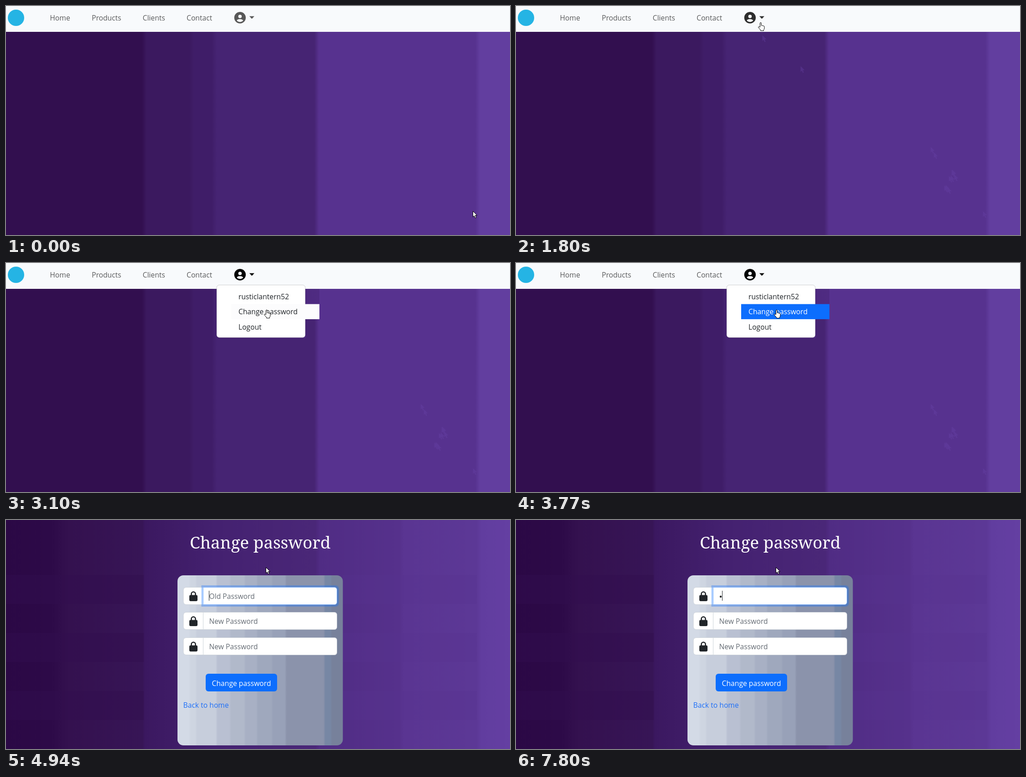
Write an HTML page that moves like this. It is 1108 px wide and 505 px high and loops after 8000 ms.

```html
<!DOCTYPE html>
<html lang="en">
<head>
<meta charset="utf-8">
<title>Change password</title>
<style>
  html, body { margin: 0; width: 100%; height: 100%; overflow: hidden; background: #320f4f; }
  svg { display: block; }
  text { font: 15.7px "Open Sans", "Noto Sans", sans-serif; fill: #212529; white-space: pre; }
  .nav text { fill: #5a5b5c; }
  .hint { fill: #656c74; }
  .title { font: 36.9px "Noto Serif", "Liberation Serif", serif; fill: #fff; }
</style>
</head>
<body>
<svg id="stage" width="1108" height="505" viewBox="0 0 1108 505"></svg>
<script>
const LOOP = 8000;
const MENU_OPEN = 2290, MENU_CLOSE = 3970, FORM_OPEN = 4940, TYPED = 7800;
const HAND_FROM = 1386;
const BLUE = '#0d6efd';

const ARROW = 'M.5 .5V13.2L3.4 10.5 5.6 15.5 7.8 14.6 5.6 9.6H9.6Z';
const HAND = 'M4.5 10.5V2Q4.5 .5 5.9 .5T7.3 2V7Q8.8 6 9.8 7.4 11.2 6.7 12.1 8.1 13.9 7.7 14 9.6V13' +
  'Q14 15 12.5 16.6V18.5H5.8V17L1 11.6Q.2 9.8 1.9 9.7Z';

const text = (x, y, str, attrs = '') => `<text x="${x}" y="${y}" ${attrs}>${str}</text>`;
const rect = (x, y, w, h, attrs) => `<rect x="${x}" y="${y}" width="${w}" height="${h}" ${attrs}/>`;

// Horizontal gradient from [x, colour] points.
function smooth(id, x0, x1, points) {
  const stops = points.map(([x, c]) => `<stop offset="${(x - x0) / (x1 - x0)}" stop-color="${c}"/>`);
  return `<linearGradient id="${id}" gradientUnits="userSpaceOnUse" x1="${x0}" x2="${x1}">${stops.join('')}</linearGradient>`;
}

// Flat colour bands; neighbours blend over 2 * soft px.
function bands(id, x0, x1, soft, list) {
  return smooth(id, x0, x1, list.flatMap(([x, c], i) =>
    i ? [[x - soft, list[i - 1][1]], [x + soft, c]] : [[x, c]]));
}

const defs = `<defs>
  ${bands('homeBg', 0, 1108, 5, [[0, '#320f4f'], [304, '#3b195f'], [408, '#3f1d68'],
    [458, '#462473'], [683, '#57328f'], [1037, '#623e9f']])}
  ${smooth('formBg', 0, 1108, [[0, '#2b0845'], [100, '#2d0a48'], [138, '#34114f'], [300, '#371556'],
    [306, '#3b1860'], [460, '#442170'], [680, '#4a2778'], [690, '#502c84'], [865, '#56318c'],
    [875, '#5a3592'], [1035, '#5c3896'], [1045, '#613d9f'], [1108, '#643fa2']])}
  ${bands('cardBg', 377, 740, 2, [[377, '#d3dae6'], [404, '#ced5e1'], [418, '#c7cedc'], [463, '#b9c0d2'],
    [493, '#b1b9ca'], [525, '#a8b0c4'], [552, '#9fa8bd'], [585, '#98a1b8'], [615, '#8b93ab'],
    [700, '#7787a4'], [715, '#77819b']])}
  ${smooth('menuTrace', 463, 689, [[463, '#43206d'], [689, '#4f2b82']])}
</defs>`;

const userIcon = `<g id="user">
  <g transform="translate(501.8 13.1) scale(.0494)">
    <circle cx="256" cy="256" r="256"/>
    <circle cx="256" cy="200" r="76" fill="#f8fafc"/>
    <path d="M399 384C377 346 335 320 288 320H224C177 320 135 346 113 384 148 423 199 448 256 448S364 423 399 384Z" fill="#f8fafc"/>
  </g>
  <path d="M535 22.6H546L540.5 28.2Z"/>
</g>`;

const home = `<g id="home">
  ${rect(0, 0, 1108, 505, 'fill="url(#homeBg)"')}
  <g id="traces" fill="#6a45a8" opacity=".35"></g>
  <g id="menuShade" fill="url(#menuTrace)">
    ${rect(463, 57, 196, 109, '')}
    ${rect(659, 57, 30, 67, 'id="itemShade"')}
  </g>
  <g class="nav">
    ${rect(0, 0, 1108, 57, 'fill="#f8fafc"')}
    <circle cx="22" cy="26" r="18" fill="#25b4e4"/>
    ${text(96.5, 32, 'Home')}${text(188.5, 32, 'Products')}
    ${text(300.5, 32, 'Clients')}${text(397, 32, 'Contact')}
    ${userIcon}
  </g>
  <g id="menu">
    ${rect(463, 48.5, 195, 116, 'rx="6" fill="#fff" stroke="#000" stroke-opacity=".18"')}
    ${rect(495, 57.3, 194, 33.3, 'id="hover"')}
    ${text(511, 80, 'rusticlantern52')}
    ${text(511, 113.3, 'Change password', 'id="change"')}
    ${text(511, 146.6, 'Logout')}
  </g>
</g>`;

const lock = y => rect(403, y + 17, 18, 13.5, 'rx="2.4" fill="#212529"') +
  `<path d="M407.5 ${y + 18}v-3.5a4.5 4.5 0 0 1 9 0v3.5" fill="none" stroke="#212529" stroke-width="2.6"/>`;

function field(y, hint, id, focused) {
  const ring = focused
    ? `<path d="M429.5 144H723Q732 144 732 153V182Q732 191 723 191H429.5Z" fill="${BLUE}" opacity=".33"/>` : '';
  return rect(390, y, 50, 38, 'rx="6" fill="#fff" stroke="#ced4da"') + lock(y) + ring +
    `<path d="M433.5 ${y}H721.5Q727.5 ${y} 727.5 ${y + 6}V${y + 32}Q727.5 ${y + 38} 721.5 ${y + 38}H433.5Z"
      fill="#fff" stroke="${focused ? '#86b7fe' : '#ced4da'}"/>` +
    text(446.5, y + 25.7, hint, `class="hint" id="${id}"`);
}

const tileRows = [121, 249, 377].map(y =>
  rect(0, y, 303, 64, 'fill="#320f4f" opacity=".45"') +
  rect(740, y, 295, 64, 'fill="#57328f" opacity=".3"')).join('');

const form = `<g id="form">
  ${rect(0, 0, 1108, 505, 'fill="url(#formBg)"')}${tileRows}
  ${text(404, 62.5, 'Change password', 'class="title"')}
  ${rect(377, 122, 363.5, 375, 'rx="13" fill="url(#cardBg)"')}
  ${field(148.5, 'Old Password', 'oldHint', true)}
  ${field(203.5, 'New Password', 'newHint')}
  ${field(259.5, 'New Password', 'repeatHint')}
  <circle id="bullet" cx="450" cy="169" r="2.2" fill="#212529"/>
  ${rect(446, 156, 1, 22, 'id="caret" fill="#212529"')}
  ${rect(439, 339, 157, 39, `rx="6" fill="${BLUE}"`)}
  ${text(452.5, 365.7, 'Change password', 'style="fill:#fff"')}
  ${text(389.5, 413.8, 'Back to home', 'style="fill:#1f70f8"')}
</g>`;

const stage = document.getElementById('stage');
stage.innerHTML = defs + home + form + '<path id="cursor" fill="#fff" stroke="#000"/>';
const el = id => document.getElementById(id);
const show = (id, on) => el(id).setAttribute('display', on ? 'inline' : 'none');

// n pointer positions spread over a time span, each held until the next.
function glide(t0, t1, n, [x0, y0], [x1, y1], ease = k => k) {
  return Array.from({ length: n }, (_, i) => {
    const k = i / (n - 1), e = ease(k);
    return [t0 + (t1 - t0) * k, Math.round(x0 + (x1 - x0) * e), Math.round(y0 + (y1 - y0) * e)];
  });
}

const pointer = [
  [0, 1026, 452], [70, 948, 399], [190, 941, 395],
  [440, 944, 394], [525, 951, 374], [610, 955, 373], [695, 963, 371], [780, 958, 360],
  [865, 958, 361], [950, 957, 361], [1035, 918, 322], [1120, 911, 310],
  [1250, 625, 132], [1318, 541, 64],
  ...glide(HAND_FROM, 1930, 9, [541, 43], [536, 33]),
  [2080, 535, 32],
  ...glide(2690, 3100, 7, [537, 37], [572, 103], k => 1 - (1 - k) ** 1.6),
  [MENU_CLOSE, 571, 104],
];

// Faint marks that the pointer leaves on the dark area.
const marks = pointer.filter(([t, , y]) => t < HAND_FROM && y > 57);
el('traces').innerHTML = marks.map(([, x, y]) =>
  `<path d="${ARROW}" transform="translate(${x} ${y})"/>`).join('');
const traces = [...el('traces').children];

function drawHome(t, y) {
  traces.forEach((mark, i) => {
    const left = i + 1 < marks.length ? marks[i + 1][0] : HAND_FROM;
    mark.setAttribute('display', t >= left ? 'inline' : 'none');
  });
  const open = t >= MENU_OPEN && t < MENU_CLOSE;
  show('menu', open);
  show('menuShade', t >= MENU_OPEN);
  show('itemShade', t >= 2900);

  const fade = Math.min(1, Math.max(0, (t - HAND_FROM) / 150));
  const alpha = open ? 1 : t >= MENU_CLOSE ? 0.65 : 0.65 + 0.17 * fade;
  const grey = Math.round(250 * (1 - alpha));
  el('user').setAttribute('fill', `rgb(${grey},${grey},${grey})`);

  const item = y >= 91 ? 1 : 0;
  const pressed = t >= 3770 && t < 3830;
  show('hover', open && y >= 57);
  el('hover').setAttribute('y', 57.3 + 33.3 * item);
  el('hover').setAttribute('fill', pressed ? BLUE : '#fcfcfd');
  el('change').style.fill = pressed ? '#fff' : '';
}

function drawForm(t) {
  const typed = t >= TYPED;
  const blinks = [5390, 5920, 6470, 7000, 7530].filter(b => t >= b).length;
  show('oldHint', !typed);
  show('bullet', typed);
  show('caret', typed || blinks % 2 === 0);
  el('caret').setAttribute('x', typed ? 453 : 446);
}

function draw(t) {
  const [, x, y] = pointer.filter(p => p[0] <= t).pop();
  const hand = t >= HAND_FROM && t < MENU_CLOSE;
  const onForm = t >= FORM_OPEN;
  show('home', !onForm);
  show('form', onForm);
  if (onForm) drawForm(t); else drawHome(t, y);
  el('cursor').setAttribute('d', hand ? HAND : ARROW);
  el('cursor').setAttribute('transform', `translate(${hand ? x - 5 : x} ${y})`);
}

const start = performance.now();
function tick() {
  draw((performance.now() - start) % LOOP);
  requestAnimationFrame(tick);
}
tick();
</script>
</body>
</html>
```
